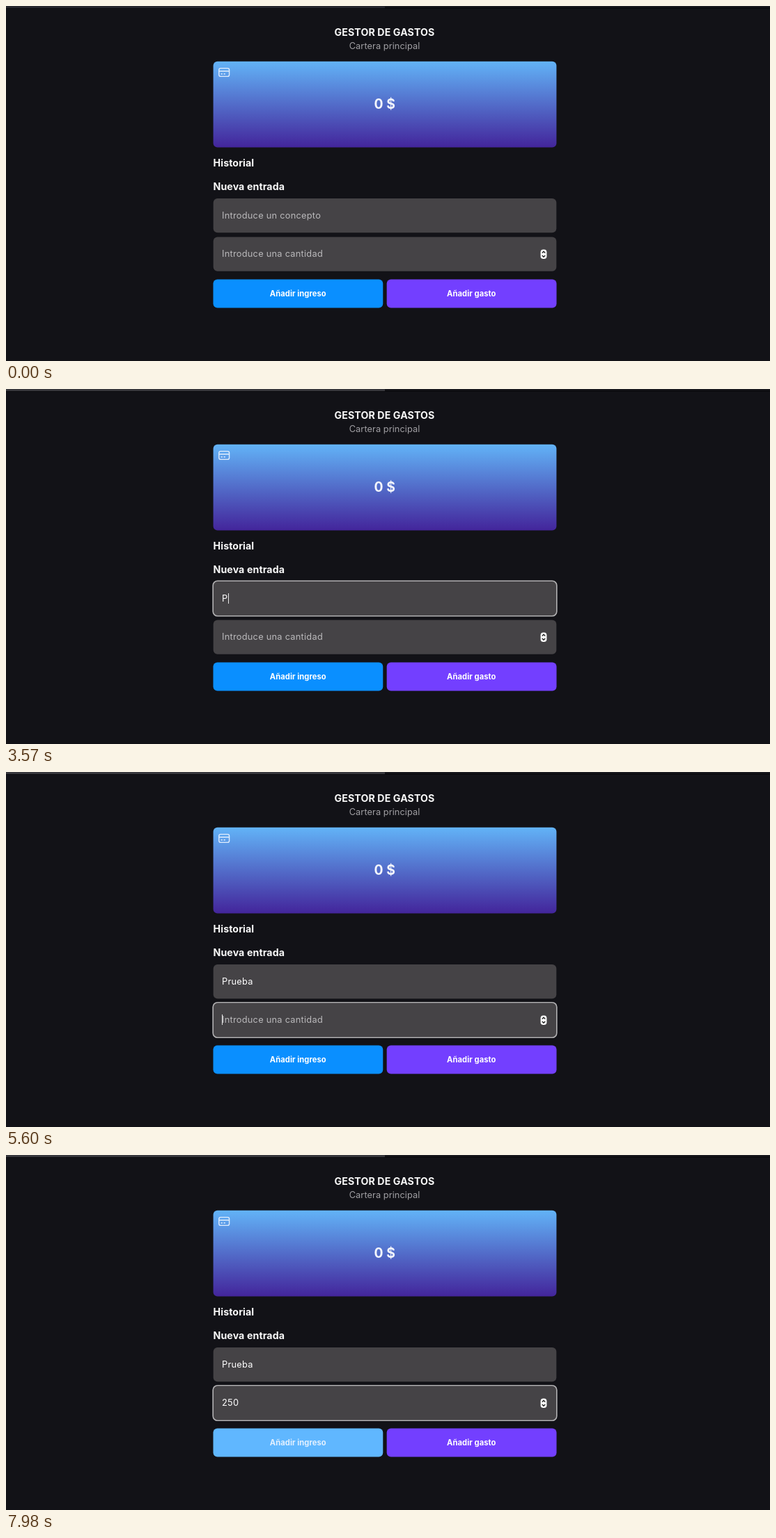
These frames come from a looping animation (1097 by 511 pixels, 8000 ms). An HTML page:

```html
<!DOCTYPE html>
<html lang="es">
<head>
<meta charset="utf-8">
<title>Gestor de gastos</title>
<style>
  html, body { margin: 0; width: 100%; height: 100%; overflow: hidden; background: #121217; }
  svg { display: block; width: 100%; height: 100%; }
  text { font: 400 12.8px Inter, "Open Sans", sans-serif; letter-spacing: .25px; fill: #fff; }
  .mid { text-anchor: middle; }
  .head { font-size: 14.2px; font-weight: 700; letter-spacing: .1px; fill: #f8f8f8; }
  .sub { fill: #a09fa3; letter-spacing: .05px; }
  .total { font-size: 19.4px; font-weight: 700; letter-spacing: 0; fill: #f4f6fc; }
  .btn { font-size: 11.2px; font-weight: 700; letter-spacing: .05px; }
  .hint { fill: #bab9bb; }
  .menu { font-size: 9.9px; letter-spacing: 0; }
  .field { fill: #454346; }
</style>
</head>
<body>
<svg viewBox="0 0 1097 511">
  <defs>
    <linearGradient id="sky" x2="0" y2="1">
      <stop stop-color="#62b3f7"/>
      <stop offset="1" stop-color="#43259b"/>
    </linearGradient>
    <filter id="soft" x="-30%" y="-30%" width="160%" height="160%">
      <feDropShadow dx="0" dy="2" stdDeviation="4" flood-opacity=".35"/>
    </filter>
  </defs>
  <rect width="1097" height="511" fill="#121217"/>
  <rect width="1097" height="2" fill="#1a1a1f"/>
  <rect y="2" width="1097" height="1.5" fill="#09090c"/>
  <rect id="bar" width="544" height="3"/>

  <text class="head mid" x="543.5" y="43">GESTOR DE GASTOS</text>
  <text class="sub mid" x="543.5" y="62.3">Cartera principal</text>

  <rect x="297.6" y="79.7" width="492.8" height="123.7" rx="6" fill="url(#sky)"/>
  <g fill="none" stroke="#e0edfd" stroke-width="1.4">
    <rect x="305.8" y="89.6" width="14.8" height="11.8" rx="2.4"/>
    <path d="M306 93.8h14.5M308.6 97.8h2.2M312.6 97.8h2.2"/>
  </g>
  <text class="total mid" x="543.8" y="148">0 $</text>

  <text class="head" x="297.5" y="231">Historial</text>
  <text class="head" x="297.5" y="264.8">Nueva entrada</text>

  <rect class="field" x="297.7" y="277" width="492.6" height="49.2" rx="6"/>
  <rect class="field" x="297.7" y="332.5" width="492.6" height="49.2" rx="6"/>
  <rect id="ring" x="297.2" width="493.6" height="50.6" rx="6.6" fill="none" stroke="#b3b2b4" stroke-width="1.6"/>
  <text id="concept" x="310" y="305.8"></text>
  <text id="amount" x="310" y="361.3"></text>
  <rect id="caret" width="1" height="15" fill="#e8e8e8"/>
  <rect x="767.6" y="350.5" width="8.8" height="13.5" rx="3.8" fill="#fff"/>
  <path d="M769.8 355.5l2.2-2.2 2.2 2.2M769.8 359l2.2 2.2 2.2-2.2" fill="none" stroke="#222" stroke-width="1.5"/>

  <rect id="income" x="297.5" y="393.6" width="243.8" height="40.8" rx="6"/>
  <text id="incomeLabel" class="btn mid" x="419.3" y="418">Añadir ingreso</text>
  <rect x="546.7" y="393.6" width="243.8" height="40.8" rx="6" fill="#733fff"/>
  <text class="btn mid" x="668.3" y="418">Añadir gasto</text>

  <g id="menu">
    <rect x="293" y="328.5" width="69.5" height="50.5" rx="6.5" fill="#29282b" stroke="#504f52" filter="url(#soft)"/>
    <path d="M303 353.5h49" stroke="#58575a"/>
    <text class="menu" x="302.7" y="345.6">Prefectura</text>
    <text class="menu" x="302.7" y="369.6">Prefectura</text>
  </g>
</svg>
<script>
const LOOP = 8000;
const el = id => document.getElementById(id);

// Each step: start time, focused field (0 = none), concept, amount, caret x (0 = hidden)
const steps = [
  [0, 0, '', '', 0],
  [1680, 1, '', '', 310],
  [2240, 1, '', '', 0],
  [2800, 1, '', '', 310],
  [3290, 1, '', '', 0],
  [3500, 1, 'P', '', 319],
  [4060, 1, 'Pr', '', 324],
  [4340, 1, 'Pru', '', 334],
  [4620, 1, 'Prueb', '', 348],
  [4900, 1, 'Prueba', '', 355],
  [5460, 1, 'Prueba', '', 0],
  [5600, 2, 'Prueba', '', 310],
  [6090, 2, 'Prueba', '2', 317],
  [6510, 2, 'Prueba', '25', 324],
  [7070, 2, 'Prueba', '25', 0],
  [7350, 2, 'Prueba', '250', 333],
  [7840, 2, 'Prueba', '250', 0],
];
const menuFade = [[0, 0], [4130, 1], [4340, .6], [4410, .25], [4480, 0]];
const hoverFade = [[0, 0], [7840, .33], [7910, .67], [7980, 1]];

const at = (list, t) => list.findLast(item => item[0] <= t);
const mix = (a, b, k) => `rgb(${a.map((v, i) => Math.round(v + (b[i] - v) * k))})`;
const set = (id, attrs) => {
  for (const name in attrs) el(id).setAttribute(name, attrs[name]);
};

function write(id, value, hint) {
  el(id).textContent = value || hint;
  el(id).classList.toggle('hint', !value);
}

function draw(t) {
  const [, focus, concept, amount, caretX] = at(steps, t);
  const drop = focus === 2 ? 55.5 : 0;
  const hover = at(hoverFade, t)[1];
  set('bar', { fill: t < 70 ? '#27272e' : '#38383d' });
  set('ring', { y: 276.2 + drop, opacity: focus ? 1 : 0 });
  set('caret', { x: caretX, y: Math.floor(294 + drop), opacity: caretX ? 1 : 0 });
  write('concept', concept, 'Introduce un concepto');
  write('amount', amount, 'Introduce una cantidad');
  set('menu', { opacity: at(menuFade, t)[1] });
  set('income', { fill: mix([10, 143, 255], [96, 183, 255], hover) });
  el('incomeLabel').style.fill = mix([255, 255, 255], [226, 240, 255], hover);
}

const start = performance.now();
function tick() {
  draw((performance.now() - start) % LOOP);
  requestAnimationFrame(tick);
}
tick();
</script>
</body>
</html>
```
